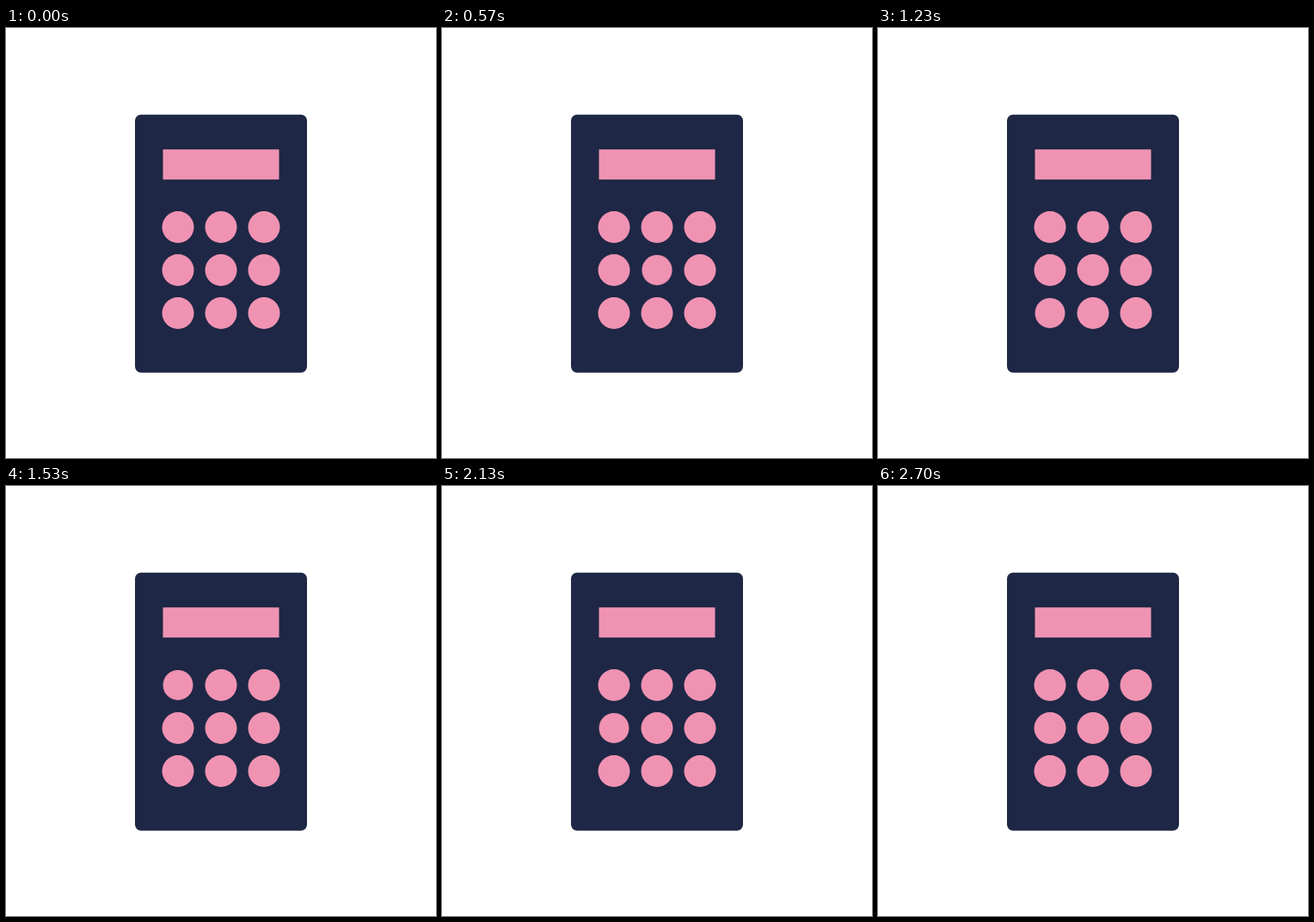
Animation, 500 px wide and 500 px high, one loop 2.73 s. Source, as an HTML page without scripts:

```html
<!DOCTYPE html>
<html lang="en">
<head>
<meta charset="utf-8">
<title>Calculator</title>
<style>
  html, body { margin: 0; width: 100%; height: 100%; overflow: hidden; background: #fff; }
  svg { display: block; width: 100%; height: 100%; }
  .body { fill: #1e2745; }
  .screen, .key { fill: #f093b3; }

  /* Each key takes a 300 ms turn within the 2730 ms loop. */
  .key {
    transform-box: fill-box;
    transform-origin: center;
    animation: press 2730ms calc(var(--turn) * 300ms) infinite;
    animation-timing-function: cubic-bezier(.333, 0, .667, 1);
  }
  @keyframes press {
    0%, 10.989%, 100% { transform: scale(1); }
    5.4945% { transform: scale(.5); }
  }
</style>
</head>
<body>
<svg viewBox="0 0 500 500">
  <rect class="body" x="150" y="100.7" width="200" height="300" rx="7"/>
  <rect class="screen" x="182.5" y="141.2" width="135" height="35"/>

  <circle class="key" cx="200" cy="231.5" r="18.5" style="--turn: 5"/>
  <circle class="key" cx="250" cy="231.5" r="18.5" style="--turn: 3"/>
  <circle class="key" cx="300" cy="231.5" r="18.5" style="--turn: 8"/>

  <circle class="key" cx="200" cy="281.5" r="18.5" style="--turn: 7"/>
  <circle class="key" cx="250" cy="281.5" r="18.5" style="--turn: 1"/>
  <circle class="key" cx="300" cy="281.5" r="18.5" style="--turn: 6"/>

  <circle class="key" cx="200" cy="331.5" r="18.5" style="--turn: 4"/>
  <circle class="key" cx="250" cy="331.5" r="18.5" style="--turn: 0"/>
  <circle class="key" cx="300" cy="331.5" r="18.5" style="--turn: 2"/>
</svg>
</body>
</html>
```
